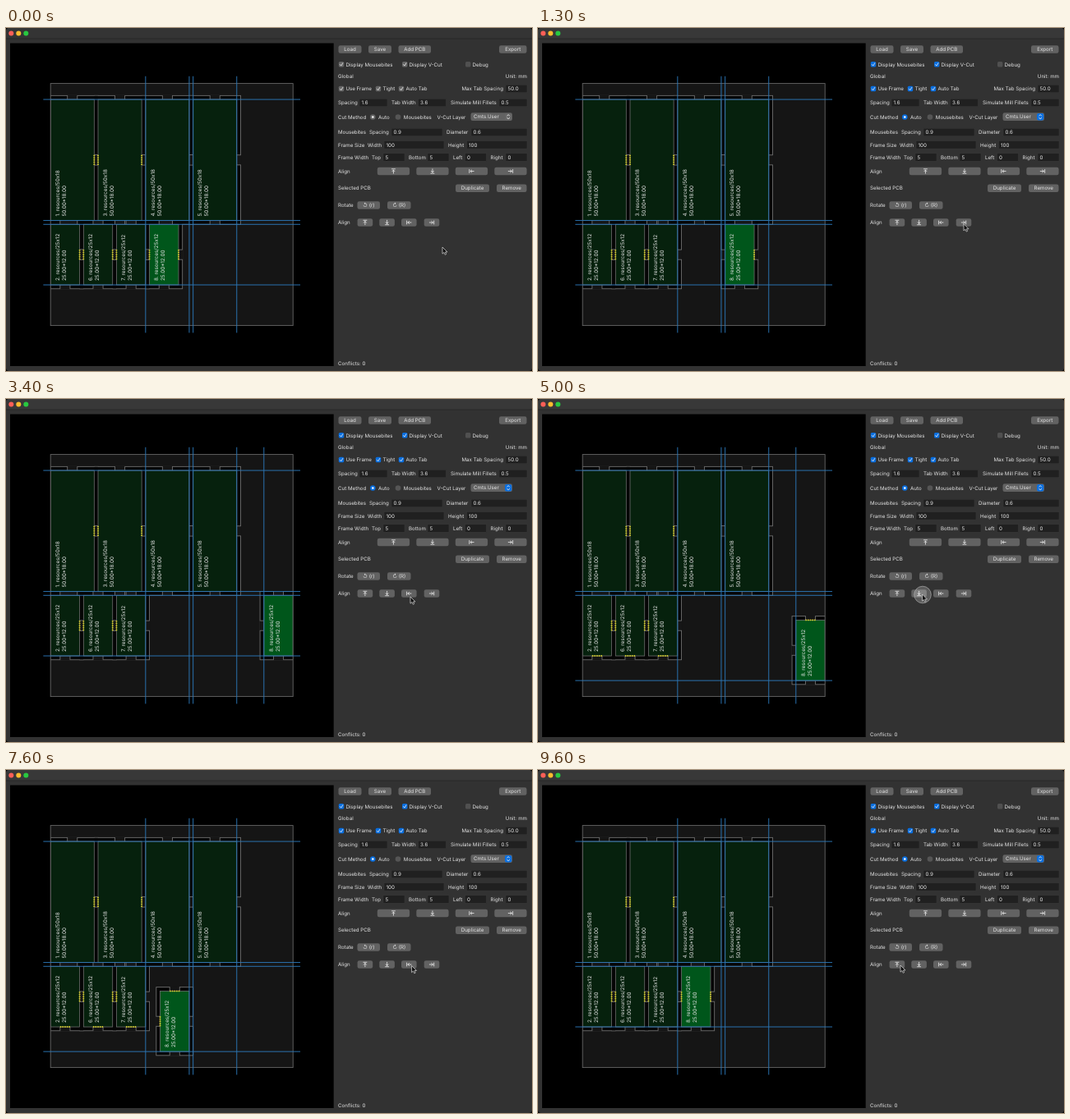
Write an HTML page that moves like this. It is 640 px wide and 418 px high and loops after 9800 ms.

```html
<!DOCTYPE html>
<html lang="en">
<head>
<meta charset="utf-8">
<title>PCB panel layout</title>
<style>
  html, body { margin: 0; width: 100%; height: 100%; overflow: hidden; background: #000; }
  svg { display: block; width: 640px; height: 418px; --accent: #666; --bar: #343434; }
  svg.active { --accent: #0a6fe0; --bar: #383838; }
  text { font: 6.2px Inter, "Liberation Sans", sans-serif; fill: #e4e4e4; text-rendering: geometricPrecision; white-space: pre; }
  .label { font-size: 2.16px; }
  .line { fill: none; stroke: #eee; stroke-width: .8; stroke-linecap: round; stroke-linejoin: round; }
</style>
</head>
<body>
<svg id="stage" viewBox="0 0 640 418">
  <defs><clipPath id="frame"><rect width="100" height="100"/></clipPath></defs>
  <g id="ui"></g>
  <g id="panel" transform="translate(54.2 67.6) scale(2.95)"></g>
  <circle id="ring" r="10.3" fill="#fff" fill-opacity=".2" stroke="#bbb" stroke-opacity=".6"/>
  <path id="cursor" d="M0 0V8.2L1.9 6.5L3.2 9.3L4.6 8.7L3.4 6H6Z" fill="#111" stroke="#ddd" stroke-width=".7"/>
</svg>
<script>
const $ = id => document.getElementById(id);
const rect = (x, y, w, h, fill, extra = '') =>
  `<rect x="${x}" y="${y}" width="${w}" height="${h}" fill="${fill}" ${extra}/>`;

// ---- Window and control panel (pixels; y is the centre of a row) ----

const text = (x, y, s, anchor = 'start') =>
  `<text x="${x}" y="${y + 2.2}" text-anchor="${anchor}">${s}</text>`;
const line = (d, extra = '') => `<path class="line" d="${d}" ${extra}/>`;
const button = (x, y, w, label = '') =>
  rect(x, y - 4.8, w, 9.6, '#626262', 'rx="2.3"') + text(x + w / 2, y, label, 'middle');
const field = (x, y, w, value) =>
  rect(x, y - 4.8, w, 9.6, '#202020', 'stroke="#3a3a3a" stroke-width=".5"') + text(x + 2.6, y, value);
const check = (x, y, label, on = true) =>
  rect(x, y - 3.2, 6.4, 6.4, on ? 'var(--accent)' : '#505050', 'rx="1.5"') +
  (on ? line(`M${x + 1.6} ${y + .2}l1.3 1.6l2.1 -3.4`) : '') + text(x + 8.6, y, label);
const radio = (x, y, label, on) =>
  `<circle cx="${x}" cy="${y}" r="3.3" fill="${on ? 'var(--accent)' : '#555'}"/>` +
  (on ? `<circle cx="${x}" cy="${y}" r="1.3" fill="#fff"/>` : '') + text(x + 6.8, y, label);
const alignButton = (x, y, w, angle) => button(x, y, w) +
  line('M-2 -2.7H2M0 2.7V-1.4M-1.5 .2L0 -1.4L1.5 .2',
    `transform="translate(${x + w / 2} ${y}) rotate(${angle})"`);
const alignRow = (y, w, xs) =>
  text(404, y, 'Align') + xs.map((x, i) => alignButton(x, y, w, [0, 180, -90, 90][i])).join('');

$('ui').innerHTML = [
  rect(0, 0, 640, 418, '#323232', 'rx="4"'),
  rect(0, 0, 640, 13, 'var(--bar)', 'rx="4"'),
  rect(0, 12.6, 640, .8, '#242424'),
  ...['#ff5f57', '#febc2e', '#28c840'].map((c, i) => `<circle cx="${6.3 + i * 9}" cy="6.5" r="3" fill="${c}"/>`),
  rect(5, 18.5, 393.7, 393.5, '#000'),

  button(404.5, 26, 28, 'Load'), button(441, 26, 28, 'Save'),
  button(477.5, 26, 39.5, 'Add PCB'), button(600, 26, 33.5, 'Export'),
  check(404.8, 44.3, 'Display Mousebites'), check(482, 44.3, 'Display V-Cut'), check(559, 44.3, 'Debug', false),
  text(404, 58.5, 'Global'), text(634, 58.5, 'Unit: mm', 'end'),
  check(404.8, 74, 'Use Frame'), check(449.8, 74, 'Tight'), check(477.8, 74, 'Auto Tab'),
  text(605, 74, 'Max Tab Spacing', 'end'), field(608, 74, 26, '50.0'),

  text(404, 91, 'Spacing'), field(430, 91, 34, '1.6'),
  text(469, 91, 'Tab Width'), field(501.5, 91, 34, '3.6'),
  text(541, 91, 'Simulate Mill Fillets'), field(600, 91, 34, '0.5'),

  text(404, 108.5, 'Cut Method'), radio(446.3, 108.5, 'Auto', true), radio(477, 108.5, 'Mousebites', false),
  text(524.5, 108.5, 'V-Cut Layer'),
  rect(565.5, 103.3, 50.5, 9.8, '#626262', 'rx="2.3"'), text(569, 108.2, 'Cmts.User'),
  rect(607, 104, 8.3, 8.4, 'var(--accent)', 'rx="2"'),
  line('M609.7 107.2l1.5 -1.7l1.5 1.7M609.7 109.3l1.5 1.7l1.5 -1.7'),

  text(404, 127, 'Mousebites'), text(442, 127, 'Spacing'), field(469, 127, 62, '0.9'),
  text(536, 127, 'Diameter'), field(566, 127, 68, '0.6'),
  text(404, 142.3, 'Frame Size'), text(440, 142.3, 'Width'), field(460, 142.3, 73, '100'),
  text(538, 142.3, 'Height'), field(560.5, 142.3, 73.5, '100'),
  text(404, 157.5, 'Frame Width'), text(445, 157.5, 'Top'), field(459, 157.5, 26, '5'),
  text(490, 157.5, 'Bottom'), field(513, 157.5, 26, '5'),
  text(544, 157.5, 'Left'), field(558.5, 157.5, 26, '0'),
  text(589.5, 157.5, 'Right'), field(608, 157.5, 26, '0'),

  alignRow(174.5, 39.3, [451.8, 499.3, 546.8, 594.3]),
  text(404, 195.2, 'Selected PCB'), button(547, 195.2, 41, 'Duplicate'), button(597, 195.2, 36.5, 'Remove'),
  text(404, 216, 'Rotate'), button(427.5, 216, 27.5, '↺ (r)'), button(464, 216, 28.5, '↻ (R)'),
  alignRow(237, 18.6, [427.6, 454.3, 481, 508.7]),
  text(404, 408.3, 'Conflicts: 0'),
].join('');

// ---- Panel (millimetres) ----

const GAP = 1.6, TAB = 3.8, EDGE = '#707070', BASE = '#151515';
const large = (id, column) => ({ id, x: column * 19.6, y: 6.6, w: 18, h: 50 });
const small = (id, x, y = 58.2) => ({ id, x, y, w: 12, h: 25 });
const fixedBoards = [
  large(1, 0), large(3, 1), large(4, 2), large(5, 3),
  small(2, 0), small(6, 13.6), small(7, 27.2),
];

const grown = (b, by, fill) => rect(b.x - by, b.y - by, b.w + 2 * by, b.h + 2 * by, fill);
const inside = e => e > .01 && e < 99.99;

// The four sides: position of the edge, outward sign, and middle along the edge.
const sidesOf = b => [
  { axis: 'x', edge: b.x, sign: -1, mid: b.y + b.h / 2 },
  { axis: 'x', edge: b.x + b.w, sign: 1, mid: b.y + b.h / 2 },
  { axis: 'y', edge: b.y, sign: -1, mid: b.x + b.w / 2 },
  { axis: 'y', edge: b.y + b.h, sign: 1, mid: b.x + b.w / 2 },
];

function tab({ axis, edge, sign, mid }, depth, width, fill) {
  const near = sign > 0 ? edge : edge - depth;
  return axis === 'x'
    ? rect(near, mid - width / 2, depth, width, fill)
    : rect(mid - width / 2, near, width, depth, fill);
}

const bites = ({ axis, edge, mid }) =>
  `<path d="M${axis === 'x' ? `${edge} ${mid - 1.8}v3.65` : `${mid - 1.8} ${edge}h3.65`}"
    stroke="#d6cf2a" stroke-width=".66" stroke-linecap="round" stroke-dasharray="0 .9"/>`;

const caption = b => {
  const lines = [`${b.id}. resources/${b.h}x${b.w}`, `${b.h}.00*${b.w}.00`];
  return lines.map((s, i) => `<text class="label"
    transform="translate(${b.x + 3.65 + i * 2.7} ${b.y + b.h - 1.7}) rotate(-90)">${s}</text>`).join('');
};

function drawPanel(selected) {
  const boards = [...fixedBoards, selected];
  // A straight cut is possible where the line passes through no board.
  const canCut = ({ axis, edge }) => inside(edge) && boards.every(b =>
    edge < b[axis] + .01 || edge > b[axis] + (axis === 'x' ? b.w : b.h) - .01);

  const cuts = new Set(), tabs = [], bitten = [];
  for (const b of boards) {
    const sides = sidesOf(b), cut = sides.map(canCut);
    sides.forEach((side, i) => {
      if (cut[i]) cuts.add(side.axis + side.edge.toFixed(1));
      else if (side.axis === 'y' && cut[0] && cut[1]) return;
      else if (inside(side.edge)) bitten.push(side);
      tabs.push(side);
    });
  }
  const all = (list, draw) => list.map(draw).join('');
  $('panel').innerHTML =
    rect(0, 0, 100, 100, BASE) +
    '<g clip-path="url(#frame)">' +
    all(boards, b => grown(b, GAP + .15, EDGE)) +
    all(boards, b => grown(b, GAP - .15, '#050505')) +
    all(tabs, s => tab(s, GAP, TAB + .6, EDGE)) +
    all(tabs, s => tab(s, GAP + .25, TAB, BASE)) +
    all(boards, b => rect(b.x, b.y, b.w, b.h, b === selected ? '#00561b' : '#06210d',
      `stroke="${EDGE}" stroke-width=".26"`)) + '</g>' +
    rect(0, 0, 100, 100, 'none', 'stroke="#686868" stroke-width=".3"') +
    all([...cuts], c => `<path d="${c[0] === 'x' ? `M${c.slice(1)} -3v106` : `M-3 ${c.slice(1)}h106`}"
      stroke="#2c78b8" stroke-width=".32"/>`) +
    all(bitten, bites) + all(boards, caption);
}

// ---- Timeline (ms) ----

const LOOP = 9800, FOCUS = 500, TOP = 58.2, LOW = 68.4;
// Mouse press, release, and the place of the selected board after the release.
const clicks = [
  [500, 700, 40.8, TOP], [800, 1000, 45.2, TOP], [1100, 1300, 58.8, TOP], [1400, 1600, 64.8, TOP],
  [1800, 2000, 78.4, TOP], [2300, 2500, 88, TOP], [4000, 4200, 88, LOW], [5000, 5300, 88, LOW],
  [5800, 6000, 78.4, LOW], [6700, 6900, 64.8, LOW], [7000, 7200, 58.8, LOW], [7400, 7600, 45.2, LOW],
  [8300, 8600, 40.8, LOW], [9500, 9600, 40.8, TOP],
];
const path = [
  [0, 531, 267], [300, 518, 239], [2900, 518, 238.5], [3400, 492, 241], [3900, 467.5, 238],
  [5200, 467.5, 238], [5700, 494, 238.5], [7900, 493.5, 238.5], [8100, 491, 238],
  [8600, 491, 238], [9300, 441, 238], [LOOP, 441, 238],
];

function pointer(t) {
  const i = path.findIndex(p => p[0] > t);
  const [t0, x0, y0] = path[i - 1], [t1, x1, y1] = path[i];
  const k = (t - t0) / (t1 - t0);
  return [x0 + (x1 - x0) * k, y0 + (y1 - y0) * k];
}

let shown = '';
function render(now) {
  const t = Math.floor(now % LOOP / 100) * 100;
  const [x, y] = pointer(t);
  $('stage').classList.toggle('active', t >= FOCUS);
  $('cursor').setAttribute('transform', `translate(${x} ${y})`);
  $('ring').setAttribute('transform', `translate(${x + .5} ${y + .5})`);
  $('ring').style.display = clicks.some(([down, up]) => t >= down && t < up) ? '' : 'none';

  const [, , bx, by] = clicks.filter(c => c[1] <= t).pop() || clicks[0];
  if (shown !== bx + ' ' + by) {
    shown = bx + ' ' + by;
    drawPanel(small(8, bx, by));
  }
  requestAnimationFrame(render);
}
render(0);
</script>
</body>
</html>
```
